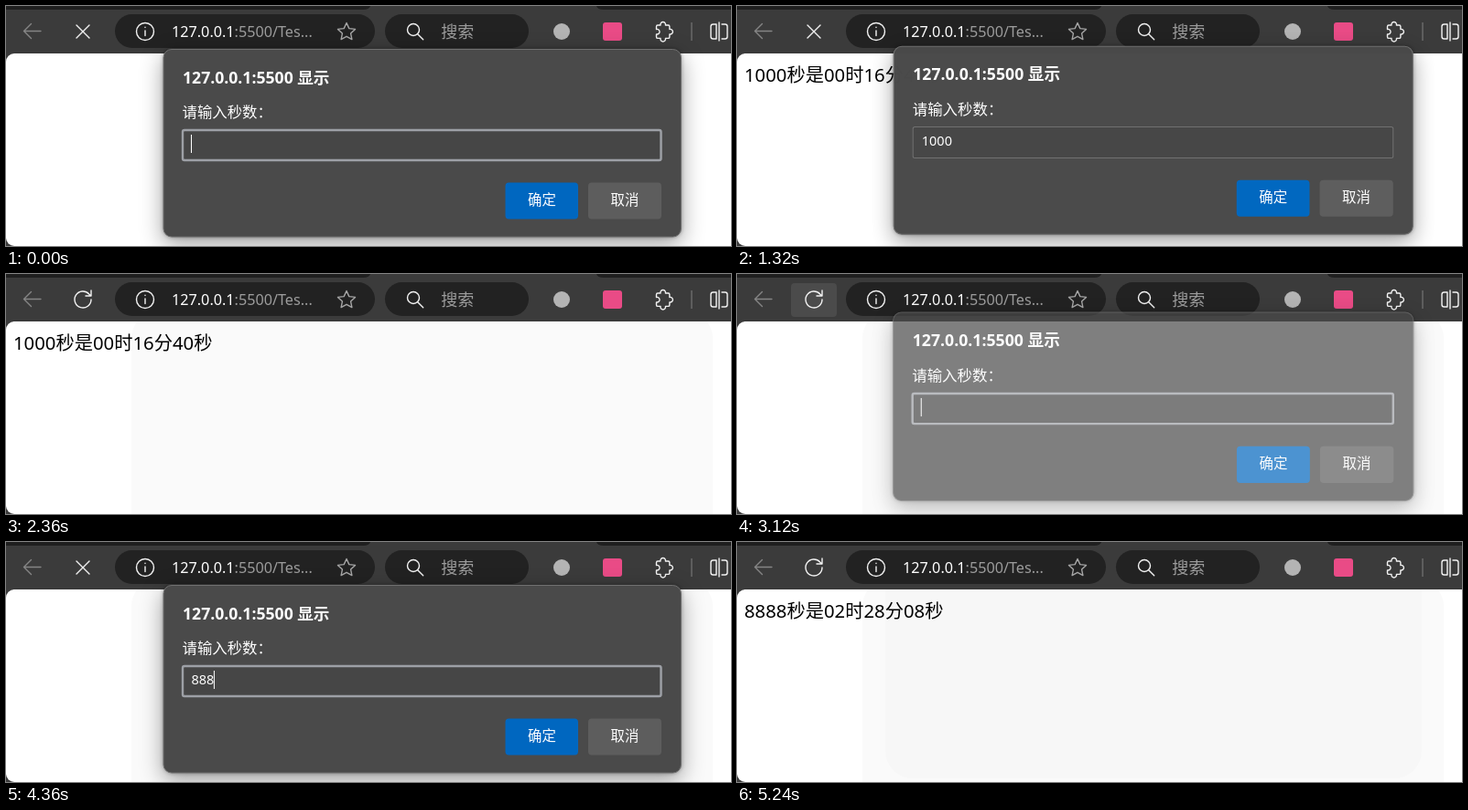
Recreate the animation shown at these times as an HTML page. Size 792 px wide and 263 px high, loop 6.84 s.

```html
<!DOCTYPE html>
<html lang="zh-CN">
<head>
<meta charset="utf-8">
<title>秒数换算</title>
<style>
  html, body { margin: 0; width: 100%; height: 100%; overflow: hidden; background: #3b3b3b; }
  svg { display: block; width: 792px; height: 263px; }
  text { font-family: "Noto Sans", "Noto Sans CJK SC", "Noto Sans CJK", sans-serif; fill: #fff; white-space: pre; }
  .line { fill: none; stroke: #f2f2f2; stroke-width: 1.4; stroke-linecap: round; stroke-linejoin: round; }
  .dim { stroke: #858585; }
  .soft { stroke: #a6a6a6; }
  .pill { fill: #222; }
  .label { font-size: 15.4px; }
  .grey { fill: #9c9c9c; }
  #result { font-size: 20.3px; fill: #000; }
  #dialog { transform-origin: 455px 150px; }
  #panel {
    fill: #4a4a4a; stroke: #707070;
    filter: drop-shadow(0 0 2px rgba(0, 0, 0, .3)) drop-shadow(0 8px 12px rgba(0, 0, 0, .36));
  }
</style>
</head>
<body>
<svg viewBox="0 0 792 263" xmlns="http://www.w3.org/2000/svg">
  <defs>
    <clipPath id="pageClip"><rect y="52" width="810" height="211" rx="9"/></clipPath>
  </defs>

  <!-- toolbar -->
  <rect width="792" height="263" fill="#3b3b3b"/>
  <path d="M0 0H398q-1 4-8 4H0zM645 0H792V4H653q-7 0-8-4z" fill="#1f1f1f"/>
  <path class="line dim" d="M38 27.5H19.5M27.5 19.5l-8 8 8 8"/>
  <rect id="hover" x="59" y="10" width="50" height="37" rx="4" fill="#4b4b4b"/>
  <path id="stop" class="line" d="M77 21l14 14M91 21l-14 14"/>
  <path id="reload" class="line" d="M93 28a9 9 0 1 1-2.3-6l2 2M93 18v6h-6"/>

  <rect class="pill" x="119" y="9" width="284" height="37" rx="18.5"/>
  <circle class="line" cx="152" cy="28" r="9.5"/>
  <path class="line" d="M152 27v5.5M152 23.3v.2"/>
  <text x="181" y="34" font-size="16.2">127.0.0.1<tspan class="grey">:5500/Tes...</tspan></text>
  <path id="star" class="line soft"/>

  <rect class="pill" x="414" y="9" width="157" height="37" rx="18.5"/>
  <circle class="line" cx="445" cy="26" r="6.5"/>
  <path class="line" d="M449.7 30.7l6 6"/>
  <text class="grey" x="475.3" y="34.5" font-size="18">搜索</text>

  <circle cx="607" cy="28" r="9" fill="#b4b4b4"/>
  <rect x="652" y="18" width="21" height="20" rx="3" fill="#e94b86"/>
  <path class="line" d="M712 21h3a2.800 2.800 0 1 1 5.400 0h3q1.500 0 1.500 1.500v3a2.800 2.800 0 1 1 0 5.400v3q0 1.500-1.500 1.500h-3a2.800 2.800 0 1 1-5.400 0h-3q-1.500 0-1.500-1.500v-3a2.800 2.800 0 1 0 0-5.400v-3q0-1.500 1.500-1.500z"/>
  <path d="M749 18v20" stroke="#6a6a6a" stroke-width="1.5"/>
  <path class="line" d="M776 20h-3.500q-2.500 0-2.500 2.500v11q0 2.500 2.500 2.500h3.500zM779 18v20M782 20h3.500q2.500 0 2.500 2.500v11q0 2.500-2.500 2.500h-3.500"/>

  <!-- page -->
  <g clip-path="url(#pageClip)">
    <rect y="52" width="810" height="211" fill="#fff"/>
    <rect id="haze" x="137" y="42" width="635" height="260" rx="28" fill="#fafafa"/>
    <rect id="haze2" x="162" y="20" width="586" height="239" rx="30" fill="#f7f7f7"/>
  </g>
  <text id="result" x="8" y="83"></text>

  <!-- prompt -->
  <g id="dialog">
    <rect id="panel" x="172" y="47.5" width="565.5" height="205.5" rx="9"/>
    <text x="193" y="84.5" font-size="17.6" font-weight="700">127.0.0.1:5500 显示</text>
    <text x="192.5" y="121.8" font-size="16.4">请输入秒数：</text>
    <rect x="193" y="135.5" width="523" height="34" rx="2" fill="#464646" stroke="#707070"/>
    <rect id="focus" x="193" y="136" width="522.5" height="33" rx="2" fill="#464646" stroke="#9da0a6" stroke-width="2.4"/>
    <text id="typed" x="202.5" y="156.3" font-size="14.5"></text>
    <rect id="caret" y="141" width="1" height="20" fill="#fff"/>
    <rect x="545.5" y="193.500" width="79.500" height="40" rx="4" fill="#0067c0"/>
    <text class="label" x="570" y="218">确定</text>
    <rect x="636" y="193.500" width="80" height="40" rx="4" fill="#5d5d5d"/>
    <text class="label" x="660.500" y="218">取消</text>
  </g>
</svg>
<script>
const LOOP = 6840, TICK = 40, PITCH = 8.3;
const rounds = [
  { seconds: 1000, open: -640, keys: [280, 520, 680, 800], close: 1280, done: 1440 },
  { seconds: 8888, open: 3000, keys: [4040, 4200, 4360, 4480], close: 5040, done: 5240 }
];

const $ = id => document.getElementById(id);
const show = (id, on) => { $(id).style.opacity = +on; };
const clamp = v => Math.min(1, Math.max(0, v));
const pad = n => String(Math.floor(n)).padStart(2, '0');
const answer = s => `${s}秒是${pad(s / 3600)}时${pad(s / 60 % 60)}分${pad(s % 60)}秒`;

function star(cx, cy) {
  const points = Array.from({ length: 10 }, (_, i) => {
    const a = i * Math.PI / 5, r = i % 2 ? 4.8 : 10;
    return `${cx + r * Math.sin(a)} ${cy - r * Math.cos(a)}`;
  });
  return `M${points.join('L')}z`;
}

// the prompt sinks in while fading up, and rises while fading out
function poseDialog(t, { open, close, done }) {
  const enter = 1 - clamp((t - open) / 240);
  const leave = clamp((t - close) / (done - close));
  const rise = 10 * enter + 18 * leave ** 1.3;
  const { style } = $('dialog');
  style.transform = rise ? `translateY(${-rise}px) scale(${1 + rise / 1000})` : 'none';
  style.opacity = (1 - enter ** 1.7) * (1 - leave ** 3.5);
}

function render(t) {
  const round = rounds[t > rounds[1].open ? 1 : 0];
  const { seconds, open, keys, close, done } = round;
  const count = keys.filter(k => t >= k).length;
  const sent = t > close;
  const blink = count ? t >= keys[3] + 480 : t >= keys[0] - TICK;

  poseDialog(t, round);
  $('typed').textContent = String(seconds).slice(0, count);
  $('caret').setAttribute('x', 202 + count * PITCH);
  show('caret', !sent && !blink);
  show('focus', !sent);

  $('result').textContent = sent ? answer(seconds) : '';
  show('stop', t >= open + 640 && t < done);
  show('reload', t < open + 480 || t >= done);
  show('hover', t >= 2840 && t < 3360);
  show('haze', t >= rounds[0].done);
  show('haze2', t >= rounds[1].done);
}

$('star').setAttribute('d', star(372, 28.5));
const start = performance.now();
function play() {
  const t = (performance.now() - start) % LOOP;
  render(Math.floor(t / TICK) * TICK);
  requestAnimationFrame(play);
}
play();
</script>
</body>
</html>
```
